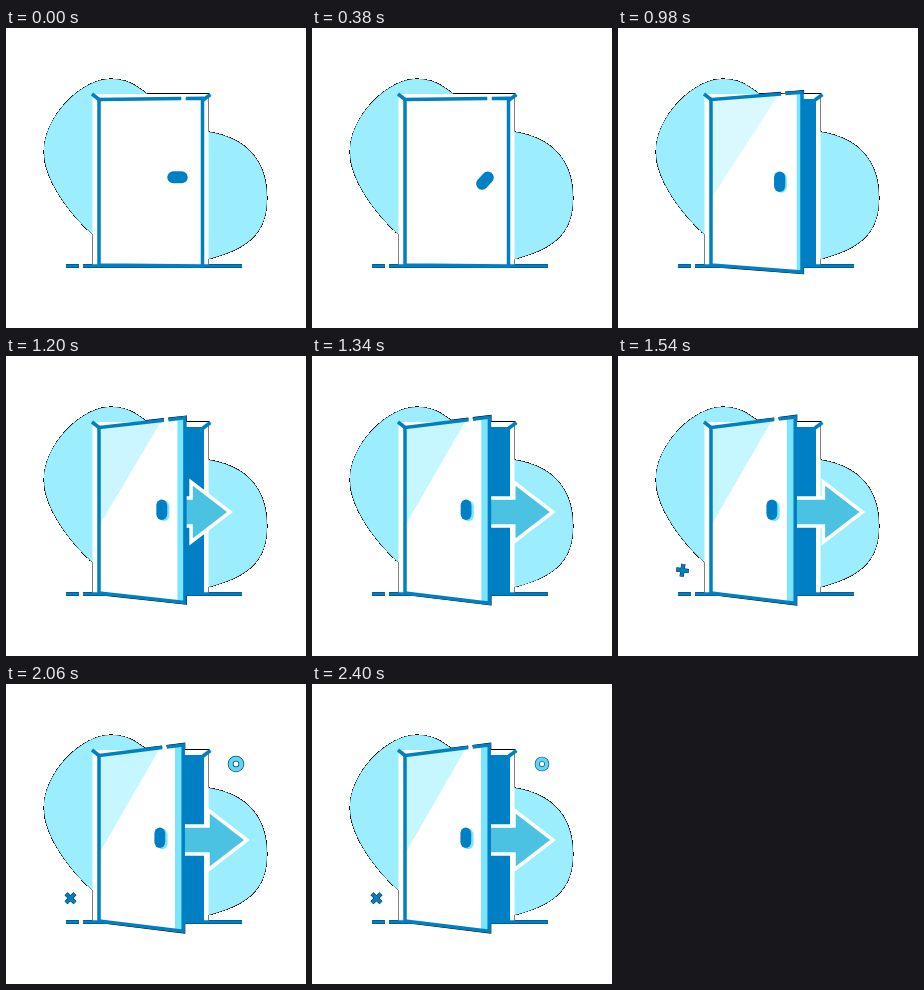
Write an HTML page that moves like this. It is 300 px wide and 300 px high and loops after 2420 ms.

```html
<!DOCTYPE html>
<html lang="en">
<head>
<meta charset="utf-8">
<title>Opening door</title>
<style>
html, body { margin: 0; width: 100%; height: 100%; overflow: hidden; background: #fff; }
svg { display: block; width: 100vw; height: 100vh; }
.line { fill: none; stroke: #0080c4; stroke-width: 3.5; }
.rim { fill: #000; stroke: #000; stroke-width: 1.2; shape-rendering: crispEdges; }
.rimline { fill: none; stroke: #000; stroke-width: 4.2; }
</style>
</head>
<body>
<svg viewBox="0 0 300 300">
  <defs>
    <path id="blob" d="M86 206C64 186 38 152 38 124C38 87 77 51 104 51C124 51 131 59 143 67L203 104C240 110 261 132 261 170C261 203 245 220 203 231Z"/>
    <rect id="frame" x="86.5" y="66" width="116" height="171"/>
    <path id="floor" d="M60 238H73M77 238H236"/>
    <path id="edge"/>
    <path id="cross" d="M-6.3 0H6.3M0 -6.3V6.3"/>
  </defs>

  <!-- thin dark rim around the joint silhouette -->
  <use href="#blob" class="rim"/>
  <use href="#frame" class="rim"/>
  <use href="#floor" class="rimline"/>
  <use href="#edge" class="rimline"/>

  <use href="#blob" fill="#9ceeff"/>
  <use href="#frame" fill="#fff"/>
  <use href="#floor" class="line"/>
  <path d="M93 71H198V238H93Z" fill="#0080c4"/>
  <path class="line" d="M86 66L93 71.5M204.5 66.5L197 72"/>

  <path id="arrow" fill="#4bc2e2" stroke="#fff" stroke-width="3.5"/>

  <path id="face" fill="#fff"/>
  <path id="gloss" fill="#c6f6ff"/>
  <path id="side" fill="#7ae5fd"/>
  <use href="#edge" class="line"/>
  <rect id="shade" x="-14.7" y="-6" width="20.4" height="12" rx="6" fill="#7ae5fd"/>
  <rect id="knob" x="-14.7" y="-6" width="20.4" height="12" rx="6" fill="#0080c4"/>

  <g id="plus">
    <use href="#cross" class="rimline"/>
    <use href="#cross" class="line"/>
  </g>
  <g id="ring">
    <circle r="5" fill="none" stroke="#0b4f78" stroke-width="5.4"/>
    <circle r="5" fill="none" stroke="#62d4f4" stroke-width="4"/>
  </g>
</svg>
<script>
const LOOP = 2420;
const $ = id => document.getElementById(id);
const set = (id, attrs) => {
  for (const k in attrs) $(id).setAttribute(k, attrs[k]);
};
const part = (t, a, b) => Math.min(1, Math.max(0, (t - a) / (b - a)));
const mix = (a, b, p) => a + (b - a) * p;
const sineOut = p => Math.sin(p * Math.PI / 2);
const sineInOut = p => (1 - Math.cos(p * Math.PI)) / 2;
const quadOut = p => 1 - (1 - p) * (1 - p);
const poly = pts => 'M' + pts.map(p => p.map(v => v.toFixed(2)).join(' ')).join('L');

function drawDoor(open, turn) {
  const x = mix(196.5, 177.2, open);
  const top = mix(70.3, 61, open), low = mix(238, 247.3, open);
  const topAt = u => mix(71.5, top, (u - 93) / (x - 93));
  const lowAt = u => mix(237, low, (u - 93) / (x - 93));
  const gap = mix(177.5, 158.5, open);
  const corners = [[93, 71.5], [93, 237], [x, low], [x, top]];

  set('edge', { d: poly([[gap - 2.2, topAt(gap - 2.2)], ...corners, [gap + 2.2, topAt(gap + 2.2)]]) });
  set('face', { d: poly(corners) + 'Z' });

  const inner = x - 8.2 * open;
  set('side', { d: poly([[inner, topAt(inner)], [x, top], [x, low], [inner, lowAt(inner)]]) + 'Z' });

  const shine = mix(173, 154, open);
  set('gloss', {
    d: poly([[94, topAt(94)], [shine, topAt(shine)], [94, mix(172, 168, open)]]) + 'Z',
    opacity: open
  });

  const knobX = mix(176, 153.8, open);
  const thick = mix(1, 0.9, open);
  const place = (dx, dy) =>
    `translate(${knobX + dx} ${149.3 + dy}) scale(${thick} 1) rotate(${-90 * turn})`;
  set('knob', { transform: place(0, 0) });
  set('shade', { transform: place(2.4 * open, 1.2 * open), opacity: open > 0 ? 1 : 0 });
}

function drawArrow(t) {
  const out = quadOut(part(t, 990, 1445));
  const back = sineInOut(part(t, 1500, 1850));
  const tip = mix(174, 244.5, out) - 3.5 * back;
  const neck = tip - 39;
  const root = Math.min(150, neck - 2);
  set('arrow', {
    d: poly([[root, 142], [neck, 142], [neck, 126], [tip, 156], [neck, 186], [neck, 170], [root, 170]]) + 'Z',
    opacity: out > 0 ? 1 : 0
  });
}

function draw(t) {
  drawDoor(quadOut(part(t, 680, 1420)), sineInOut(part(t, 100, 640)));
  drawArrow(t);

  const grow = sineOut(part(t, 1360, 1520));
  const spin = 45 * sineInOut(part(t, 1400, 1900));
  set('plus', {
    transform: `translate(64.5 214.3) rotate(${spin}) scale(${grow})`,
    opacity: grow > 0 ? 1 : 0
  });

  const pop = 1.08 * sineOut(part(t, 1720, 2000)) - 0.13 * sineInOut(part(t, 2040, 2360));
  set('ring', {
    transform: `translate(230 80) scale(${pop})`,
    opacity: pop > 0 ? 1 : 0
  });
}

let start;
function tick(now) {
  if (start === undefined) start = now;
  draw((now - start) % LOOP);
  requestAnimationFrame(tick);
}
draw(0);
requestAnimationFrame(tick);
</script>
</body>
</html>
```
